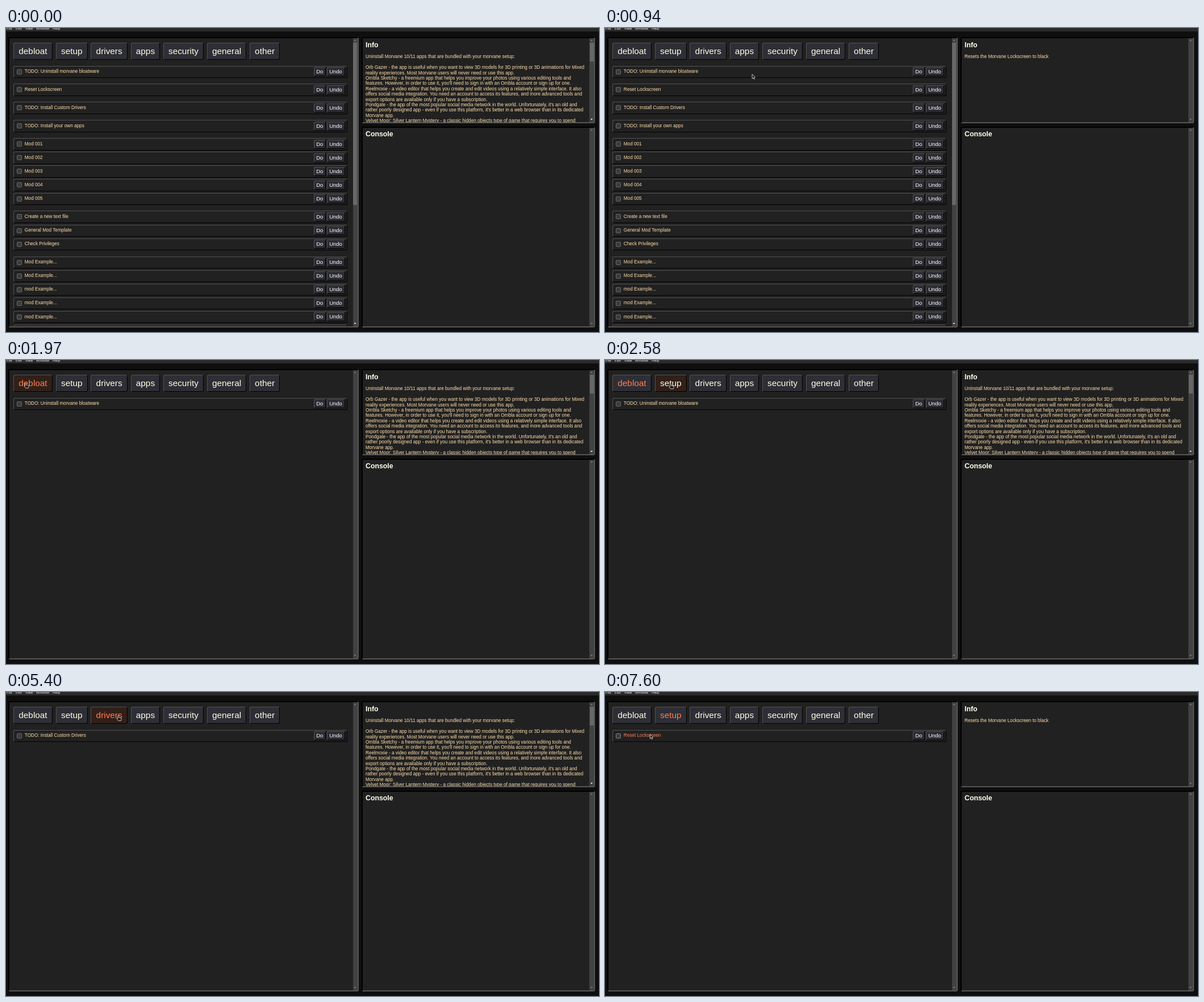
Recreate the animation shown at these times as an HTML page. Size 1044x536 px, loop 8000 ms.

```html
<!DOCTYPE html>
<html lang="en">
<head>
<meta charset="utf-8">
<title>Mod manager</title>
<style>
  html, body { margin: 0; width: 100%; height: 100%; overflow: hidden; background: #0f0f0f; }
  #stage { position: absolute; left: 0; top: 0; width: 1044px; height: 536px; overflow: hidden;
    font: 8.2px/9.4px "Liberation Sans", Arial, sans-serif; color: #ffdfad; }
  #stage div, #stage svg { position: absolute; box-sizing: border-box; white-space: pre; }
  #stage .menubar { background: #2b2b2b; }
  #stage .menu { font: 6.15px/8px "Open Sans", "Noto Sans", sans-serif; color: #fff; }
  #stage .panel { background: #212121; border: 2px solid; border-color: #000 #565656 #565656 #000;
    border-radius: 3px; overflow: hidden; }
  #stage .row, #stage .tab, #stage .btn { border: 1px solid; border-color: #525252 #000 #000 #525252; border-radius: 3px; }
  #stage .row { border-bottom-width: 1.5px; border-right-width: 1.5px; }
  #stage .tab { background: #2e2e36; color: #ffffe6; font-size: 15.35px; line-height: 28.5px; padding: 0 8.3px; }
  #stage .tab.hover { background: #321f18; }
  #stage .tab.active, #stage .row.hover .label { color: #ff7f50; }
  #stage .btn { background: #2c2c34; color: #fff; font-size: 9.5px; line-height: 14px; text-align: center; border-radius: 2px; }
  #stage .check { background: #3b3b3b; border: 1px solid #6c6c6c; border-radius: 1.5px; }
  #stage .row.hover .check { border-color: #858585; }
  #stage h2 { position: absolute; margin: 0; font-size: 12.3px; line-height: 14px; color: #fffff0; }
  #stage .track { background: #424242; }
  #stage .thumb { background: #686868; }
  #stage .arrow { width: 4px; height: 2.6px; background: #858585; }
  #stage .arrow.on { background: #fff; }
  #stage .up { clip-path: polygon(50% 0, 100% 100%, 0 100%); }
  #stage .down { clip-path: polygon(0 0, 100% 0, 50% 100%); }
  #stage .click { width: 12px; height: 12px; border-radius: 50%; background: #d2c000; opacity: .85; }
  #stage svg { left: 0; top: 0; overflow: visible; }
</style>
</head>
<body>
<div id="stage"></div>
<script>
const LOOP = 8000;
const stage = document.getElementById('stage');

function add(parent, cls, x, y, w, h, text) {
  const el = document.createElement('div');
  el.className = cls;
  el.style.left = x + 'px';
  el.style.top = y + 'px';
  if (w) el.style.width = w + 'px';
  if (h) el.style.height = h + 'px';
  if (text) el.textContent = text;
  parent.append(el);
  return el;
}

// A framed area whose children use stage coordinates.
function panel(x, y, w, h, title, titleY) {
  const frame = add(stage, 'panel', x, y, w, h);
  const body = add(frame, '', -x - 2, -y - 2, 1044, 536);
  if (title) {
    const head = document.createElement('h2');
    head.textContent = title;
    head.style.left = x + 7 + 'px';
    head.style.top = titleY - 7 + 'px';
    body.append(head);
  }
  const barX = x + w - 10;
  add(body, 'track', barX, y + 2, 8, h - 4);
  add(body, 'arrow up', barX + 2, y + 4.6);
  const down = add(body, 'arrow down', barX + 2, y + h - 8.2);
  return {
    body,
    scroll(thumbH) {
      const thumb = add(body, 'thumb', barX + .5, y + 10, 7, thumbH);
      return on => {
        thumb.hidden = !on;
        thumb.style.display = on ? '' : 'none';
        down.classList.toggle('on', on);
      };
    }
  };
}

add(stage, 'menubar', 0, 0, 1044, 5.5);
[['File', 1], ['Edit', 17], ['View', 34], ['Window', 53], ['Help', 82]]
  .forEach(([name, x]) => add(stage, 'menu', x, -3.4, 0, 0, name));

const list = panel(4, 16, 616.5, 512, '', 0);
const info = panel(626, 16, 411, 152, 'Info', 30);
panel(626, 174, 411, 354, 'Console', 187);
const showListThumb = list.scroll(286);
const showInfoThumb = info.scroll(33);

const tabs = [['debloat', 13], ['setup', 87.7], ['drivers', 149.3], ['apps', 219.5],
  ['security', 276.7], ['general', 353.6], ['other', 428.8]]
  .map(([name, x]) => add(list.body, 'tab', x, 25.5, 0, 30.5, name));

const groups = [
  ['TODO: Uninstall morvane bloatware'],
  ['Reset Lockscreen'],
  ['TODO: Install Custom Drivers'],
  ['TODO: Install your own apps'],
  ['Mod 001', 'Mod 002', 'Mod 003', 'Mod 004', 'Mod 005'],
  ['Create a new text file', 'General Mod Template', 'Check Privileges'],
  ['Mod Example...', 'Mod Example...', 'mod Example...', 'mod Example...', 'mod Example...', 'mod Example...']
];
const FIRST_ROW = 66.5;
const rows = [];
let rowY = FIRST_ROW;
groups.forEach((names, group) => {
  for (const name of names) {
    const el = add(list.body, 'row', 13, rowY, 588, 21.5);
    add(el, 'check', 5, 5, 9, 9);
    add(el, 'label', 18.8, 4.7, 0, 0, name);
    add(el, 'btn', 527.5, 1.5, 21.5, 16, 'Do');
    add(el, 'btn', 550.5, 1.5, 32, 16, 'Undo');
    rows.push({ el, group, y: rowY });
    rowY += 24.1;
  }
  rowY += 7.8;
});

const bloatText = `Uninstall Morvane 10/11 apps that are bundled with your morvane setup:

Orb Gazer - the app is useful when you want to view 3D models for 3D printing or 3D animations for Mixed
reality experiences. Most Morvane users will never need or use this app.
Ombla Sketchy - a freemium app that helps you improve your photos using various editing tools and
features. However, in order to use it, you'll need to sign in with an Ombla account or sign up for one.
Reelmoxie - a video editor that helps you create and edit videos using a relatively simple interface. It also
offers social media integration. You need an account to access its features, and more advanced tools and
export options are available only if you have a subscription.
Pondgate - the app of the most popular social media network in the world. Unfortunately, it's an old and
rather poorly designed app - even if you use this platform, it's better in a web browser than in its dedicated
Morvane app.
Velvet Moor: Silver Lantern Mystery - a classic hidden objects type of game that requires you to spend`;
const resetText = 'Resets the Morvane Lockscreen to black';
const infoText = add(info.body, '', 633, 46.4);

const click = add(stage, 'click', 0, 0);
stage.insertAdjacentHTML('beforeend', `<svg width="1" height="1"><g fill="#1c1c1c" stroke="#e6e6e6" stroke-width=".8" stroke-linejoin="round">
  <path d="M0 0V7.6L1.9 6.2L3.1 8.8L4.4 8.2L3.2 5.7L5.5 5.4Z"/>
  <path d="M-1 .9Q0-.6 1 .9V3.8L4.8 4.7Q5.9 5 5.6 6.8L4.9 9.5H.2L-2.6 6.2Q-2.5 5-1 6Z"/></g></svg>`);
const pointer = stage.querySelector('g');
const [arrow, hand] = pointer.children;

// Pointer steps: time, x, y, hovered tab, hovered row (-1 for none).
const moves = [
  [390, 318, 519, -1, -1], [460, 314, 488, -1, -1], [530, 308, 440, -1, -1], [590, 301, 380, -1, -1],
  [660, 293, 312, -1, -1], [730, 284, 240, -1, -1], [800, 275, 167, -1, -1], [870, 266, 109, -1, 1],
  [940, 259, 81.5, -1, -1], [1010, 219, 75, -1, 0], [1080, 168, 60, -1, -1], [1150, 126, 48, -1, -1],
  [1230, 84, 45, -1, -1], [1300, 58, 43, 0, -1], [1370, 42, 41, 0, -1], [1440, 34.5, 40, 0, -1],
  [2300, 40, 40, 0, -1], [2370, 57, 41, 0, -1], [2440, 79, 42, 0, -1], [2510, 104, 42, 1, -1], [2580, 115.5, 41.3, 1, -1]
];

// Eased sideways trips between the setup and drivers tabs.
function slide(start, gap, from, to) {
  for (let i = 1; i <= 7; i++) {
    const p = i / 7, x = from + (to - from) * p * p * (3 - 2 * p);
    moves.push([start + Math.round((i - 1) * gap), x, 41, x < 144 ? 1 : x > 149 ? 2 : -1, -1]);
  }
}
slide(4570, 70, 115.5, 197.5);
slide(6260, 66.6, 197.5, 115.5);
moves.push([7390, 111, 46, 1, -1], [7460, 99, 59, -1, -1], [7530, 86, 71, -1, 1], [7600, 79.3, 74.5, -1, 1]);

const clicks = [[1840, 1970, 0], [3110, 3240, 1], [5190, 5260, 2], [6990, 7060, 1]];
const infoSteps = [[0, bloatText], [870, resetText], [1010, bloatText], [7530, resetText]];
const latest = (table, t) => table.findLast(step => step[0] <= t);

function render(t) {
  const [, x, y, tab, row] = latest(moves, t) || [0, -50, -50, -1, -1];
  const done = clicks.findLast(c => c[1] <= t);
  const active = done ? done[2] : -1;
  const pressed = clicks.some(c => c[0] <= t && t < c[1]);

  tabs.forEach((el, i) => {
    el.classList.toggle('hover', i === tab);
    el.classList.toggle('active', i === active);
  });
  rows.forEach(({ el, group, y: home }, i) => {
    el.style.display = active < 0 || group === active ? '' : 'none';
    el.style.top = (active < 0 ? home : FIRST_ROW) + 'px';
    el.classList.toggle('hover', i === row);
  });
  showListThumb(active < 0);

  const text = latest(infoSteps, t)[1];
  if (infoText.textContent !== text) infoText.textContent = text;
  showInfoThumb(text === bloatText);

  pointer.setAttribute('transform', `translate(${x} ${y})`);
  arrow.style.display = tab < 0 ? '' : 'none';
  hand.style.display = tab < 0 ? 'none' : '';
  click.style.display = pressed ? '' : 'none';
  click.style.left = x - 6 + 'px';
  click.style.top = y - 5.5 + 'px';
}

const begin = performance.now();
function tick() {
  render((performance.now() - begin) % LOOP);
  requestAnimationFrame(tick);
}
tick();
</script>
</body>
</html>
```
